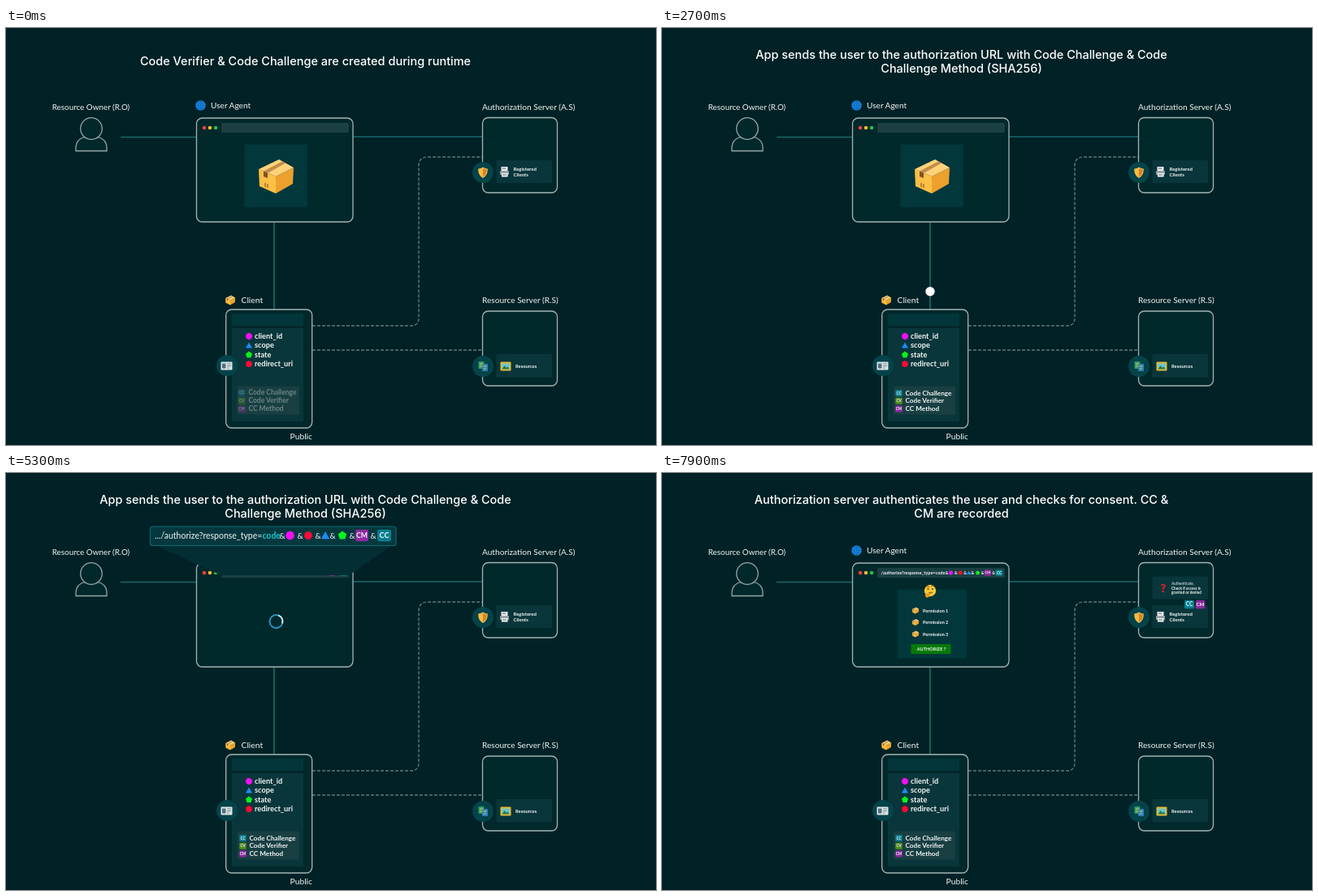
Animation, 800 px wide and 514 px high, one loop 8000 ms. Source, as an HTML page:

```html
<!DOCTYPE html>
<html lang="en">
<head>
<meta charset="utf-8">
<title>PKCE authorization flow</title>
<style>
html, body { margin: 0; width: 100%; height: 100%; overflow: hidden; background: #002125; }
svg { display: block; width: 800px; height: 514px; font: 10px Lato, sans-serif; fill: #f2f6f6; }
.title { font: 500 14.5px Inter, sans-serif; text-anchor: middle; fill: #fff; }
.b { font-weight: 700; }
.mid { text-anchor: middle; }
.box { fill: #01282b; stroke: #a3b4b4; stroke-width: 1.3; }
.line { fill: none; stroke: #17676a; stroke-width: 1.7; }
.dash { fill: none; stroke: #5d7a7b; stroke-width: 1.4; stroke-dasharray: 4 2; }
.person { fill: #01282b; stroke: #94a7a8; stroke-width: 1.3; }
.card { fill: #09363a; }
.badge { fill: #05434a; }
</style>
</head>
<body>
<svg id="stage" viewBox="0 0 800 514"></svg>
<script>
const LOOP = 8000;
const stage = document.getElementById('stage');

// Markup helpers
const rect = (x, y, w, h, fill, r = 0, extra = '') =>
  `<rect x="${x}" y="${y}" width="${w}" height="${h}" rx="${r}" fill="${fill}" ${extra}/>`;
const box = (x, y, w, h) => rect(x, y, w, h, 'none', 7, 'class="box"');
const card = (x, y, w, h) => rect(x, y, w, h, 'none', 1.5, 'class="card"');
const circle = (x, y, r, fill, extra = '') => `<circle cx="${x}" cy="${y}" r="${r}" fill="${fill}" ${extra}/>`;
const path = (d, fill, extra = '') => `<path d="${d}" fill="${fill}" ${extra}/>`;
const text = (x, y, s, size = 10, cls = '', extra = '') =>
  `<text x="${x}" y="${y}" class="${cls}" style="font-size:${size}px" ${extra}>${s}</text>`;
const group = (id, body, transform = '') => `<g id="${id}" transform="${transform}">${body}</g>`;
const at = (x, y, s, body) => `<g transform="translate(${x} ${y}) scale(${s})">${body}</g>`;
const polygon = (x, y, r, n, fill) => {
  const pts = Array.from({ length: n }, (_, i) => {
    const a = i / n * Math.PI * 2 - Math.PI / 2;
    return `${(x + r * Math.cos(a)).toFixed(2)},${(y + r * Math.sin(a)).toFixed(2)}`;
  });
  return `<polygon points="${pts.join(' ')}" fill="${fill}"/>`;
};
const title = (id, lines, y) => group(id, lines.map((s, i) =>
  `<text class="title" x="368.5" y="${y + i * 17}">${s}</text>`).join(''));

// Parameter symbols
const clientId = (x, y, r) => polygon(x, y, r, 8, '#f010f5');
const scope = (x, y, r) => polygon(x, y + r * .2, r * 1.1, 3, '#1e8cf5');
const state = (x, y, r) => polygon(x, y, r, 5, '#08f21c');
const redirect = (x, y, r) => polygon(x, y, r, 7, '#fa0a38');
const tag = (x, y, w, h, s, fill) => rect(x - w / 2, y - h / 2, w, h, fill, w * .14) +
  text(x, y + w * .18, s, w * .54, 'b mid');
const TEAL = '#087f90', LEAF = '#4f8a1f', PLUM = '#8f2a9f';

// Pictograms
const parcel = (x, y, s) => at(x, y, s,
  path('M-21-9 0 0 0 21-20 12Z', '#fcbf45') +
  path('M0 0 22-11 21 9 0 21Z', '#eca12c') +
  path('M-21-9 4-21 22-11 0 0Z', '#ffd27a') +
  path('M-15-6.500 8-18.500 12-16.500-10-4Z', '#c08d4a') +
  path('M-15-6.500-10-4-10 2-15 0Z', '#7d522b') +
  path('M-13 8v5M-10 9v5', 'none', 'stroke="#a06f2e" stroke-width="1.5"'));
const globe = circle(239.5, 95.5, 6.2, '#1685dc') +
  path('M233.7 95.5h11.6M239.5 89.6v11.8M235 92h9M235 99h9M239.5 89.6q-6 5.9 0 11.8q6-5.9 0-11.8',
    'none', 'stroke="#0d62b5" stroke-width=".6"');
const shield = path('M587 171.5q3 2 5.8 2q.5 8-5.8 11.5q-6.3-3.5-5.8-11.5q2.8 0 5.8-2Z', '#f5bd45') +
  path('M587 172.8q2.3 1.5 4.7 1.7q.2 6-4.7 9Z', '#d9822b');
const idCard = rect(264.5, 411.5, 14, 10, '#dfe6e8', 1) + rect(266, 413.5, 4.5, 6, '#53707a') +
  path('M272 414h5M272 416.5h5M272 419h3', 'none', 'stroke="#6d858c"');
const printer = rect(609.5, 171, 8, 6, '#e8eaec') + rect(608, 176, 11, 5, '#9aa2a8', 1) +
  rect(610, 179, 7.5, 4.5, '#f4f4f4') + path('M611 173h4M611 181h5', 'none', 'stroke="#58636b"');
const files = rect(581.5, 411, 7, 9, '#2f9e62', 1) + rect(586, 414, 7, 9, '#2d82b7', 1) +
  path('M583 414h4M583 417h3M587.5 417h4M587.5 420h3', 'none', 'stroke="#e4c65a"');
const picture = rect(608.5, 411.5, 13, 11, '#e8b932', 1) + rect(610.5, 413.5, 9, 7, '#63c7d9') +
  path('M610.5 420.5 613.5 416 616 419 617.5 417 619.5 420.5Z', '#287c45');
const thinker = circle(330, 145, 7.2, '#fbc83a') + circle(327.5, 143, 1, '#5b3a12') + circle(333, 143, 1, '#5b3a12') +
  path('M325.5 140.5q2-1.5 4 0M331.5 139.5q2-1.5 4 .5M328 148q3-1.5 5-.5', 'none',
    'stroke="#6b4312" stroke-width=".9"') +
  path('M324 148.5q1-1.5 2 0l5-.5q1.5.8 0 1.5l-2.5.7q1 3-2 3.5q-3 0-2.5-5.2Z', '#e99a20');

// The request address, used large in the popup and small in the address bar
const url = (start, prefix, size, cls, codeFill) =>
  text(start, 81, `${prefix}/authorize?response_type=<tspan class="b" fill="${codeFill}">code</tspan>`, size, cls) +
  [340, 362, 384, 402, 426, 452].map(x => text(x, 81, '&amp;', 10, cls + ' mid')).join('') +
  clientId(349.5, 77, 5.5) + redirect(372, 77, 5.3) + scope(393, 77, 5.5) + state(414, 77, 5.5) +
  tag(438, 77, 16, 14.5, 'CM', PLUM) + tag(465.5, 77, 17, 14.5, 'CC', TEAL);

const params = [[clientId, 'client_id'], [scope, 'scope'], [state, 'state'], [redirect, 'redirect_uri']];
const secrets = [['CC', 'Code Challenge', TEAL], ['CV', 'Code Verifier', LEAF], ['CM', 'CC Method', PLUM]];

stage.innerHTML =
  // Connections
  path('M141 134.5H235M427 134H587M330 239V347', 'none', 'class="line"') +
  path('M377 367H498Q508 367 508 357V170Q508 159 519 159H587M377 397H587', 'none', 'class="dash"') +
  group('dot', circle(0, 0, 5.7, '#fff')) +
  // Resource owner
  text(104.5, 100.5, 'Resource Owner (R.O)', 9.85, 'mid') +
  path('M86 151.5V146Q87 137.5 96 134.5Q105 140 114 134.5Q123 137.5 124 146V151.5Z', '', 'class="person"') +
  circle(105, 124, 13.3, '', 'class="person"') +
  // User agent
  globe + text(252, 99, 'User Agent', 10.1) +
  box(234.5, 111, 192.5, 128) +
  ['#f04438', '#f5b82e', '#22c24a'].map((c, i) => circle(244 + i * 7, 123, 2.3, c)).join('') +
  rect(265, 117, 157, 12, '#1b3f42', 1.5) +
  group('barUrl', url(182, '', 10.8, 'b', '#f2f6f6'), 'translate(176.2 83.5) scale(.513)') +
  group('app', rect(293.5, 143.5, 77.5, 77.5, '#02373b') + parcel(332, 183, 1)) +
  group('spinner', circle(0, 0, 8, 'none', 'stroke="#2496bd" stroke-width="1.9"') +
    path('M-8 0A8 8 0 0 1 0-8', 'none', 'stroke="#c9edf5" stroke-width="1.9"')) +
  group('consent', rect(289.5, 143.5, 85.5, 85, '#02373b') + thinker +
    [1, 2, 3].map(n => parcel(312, 155 + n * 14.5, .19) +
      text(321, 157.3 + n * 14.5, 'Permission ' + n, 5.5, 'b')).join('') +
    rect(306.5, 211, 49, 12, '#067a08') + text(331.5, 219, 'AUTHORIZE ?', 5.5, 'b mid')) +
  // Authorization server
  text(586, 100.5, 'Authorization Server (A.S)', 10.15) + box(586.5, 110.5, 92, 92.5) +
  card(603.5, 163, 68.5, 28) + printer +
  text(624.5, 176, 'Registered', 6, 'b') + text(624.5, 183, 'Clients', 6, 'b') +
  circle(587, 178, 13, '', 'class="badge"') + shield +
  group('check', card(603.5, 127.5, 68.5, 28) +
    group('mark', text(0, 6.5, '?', 22, 'b mid', 'fill="#e3202e" stroke="#e3202e" stroke-width=".8"')) +
    text(627, 138, 'Authenticate,', 4.7) + text(627, 143.5, 'Check if access is', 4.7, 'b') +
    text(627, 149, 'granted or denied', 4.7, 'b') +
    tag(649, 162, 12, 10.5, 'CC', TEAL) + tag(662.5, 162, 11.5, 10.5, 'CM', PLUM)) +
  // Resource server
  text(586, 339, 'Resource Server (R.S)', 10.1) + box(586.5, 349, 92, 92) +
  card(603.5, 402, 68.5, 28.5) + picture + text(627, 419, 'Resources', 5.8, 'b') +
  circle(587, 417, 13, '', 'class="badge"') + files +
  // Client
  parcel(276, 335.5, .28) + text(289.5, 339, 'Client', 10.3) + box(270.7, 347, 106, 146) +
  rect(278, 352, 88, 15, '#03363a') + rect(278, 370, 88, 115, '#09363a') +
  circle(272, 416, 13, '', 'class="badge"') + idCard +
  params.map(([shape, name], i) => shape(299, 380 + i * 11.4, 4.2) +
    text(306, 383 + i * 11.4, name, 9.2, 'b')).join('') +
  rect(284.5, 441.5, 76.5, 35, '#193f42', 1.5) +
  group('secrets', secrets.map(([s, name, c], i) => tag(291.5, 450 + i * 9.7, 8.5, 8, s, c) +
    text(299.5, 452.5 + i * 9.6, name, 8.2, 'b')).join('')) +
  text(349.5, 507, 'Public', 10.3) +
  // Enlarged address
  group('popup', path('M177 86H480L422 126H265Z', '#032f34') +
    rect(177.5, 66, 302.5, 23.5, '#04383e', 3, 'stroke="#0b6b72" stroke-width="1.2"') +
    url(183, '...', 10.5, '', '#18c3c8')) +
  // Headings
  title('title1', ['Code Verifier &amp; Code Challenge are created during runtime'], 46) +
  title('title2', ['App sends the user to the authorization URL with Code Challenge &amp; Code',
    'Challenge Method (SHA256)'], 38) +
  title('title3', ['Authorization server authenticates the user and checks for consent. CC &amp;',
    'CM are recorded'], 38);

const el = id => document.getElementById(id);
const ramp = (t, from, to) => Math.min(1, Math.max(0, (t - from) / (to - from)));
const easeQuad = p => p < .5 ? 2 * p * p : 1 - 2 * (1 - p) ** 2;
const easeCubic = p => p < .5 ? 4 * p ** 3 : 1 - 4 * (1 - p) ** 3;
const backIn = (p, s = 2) => p * p * ((s + 1) * p - s);
const fade = (id, v) => el(id).setAttribute('opacity', v);
const move = (id, v) => el(id).setAttribute('transform', v);
const zoom = (id, x, y, s) => {
  el(id).style.display = s > .001 ? '' : 'none';
  move(id, `translate(${x} ${y}) scale(${s}) translate(${-x} ${-y})`);
};

function draw(t) {
  fade('title1', 1 - ramp(t, 1900, 2150));
  fade('title2', ramp(t, 2150, 2400) * (1 - ramp(t, 5750, 6000)));
  fade('title3', ramp(t, 6000, 6250));

  const reveal = ramp(t, -300, 500);
  fade('secrets', reveal);
  zoom('secrets', 328, 459, 1.06 - .06 * reveal);

  const trip = easeCubic(ramp(t, 2370, 3270));
  move('dot', `translate(330 ${346 - 107 * trip})`);
  fade('dot', ramp(t, 2370, 2500) * (1 - ramp(t, 3200, 3350)));

  fade('barUrl', ramp(t, 3950, 4250));
  zoom('popup', 328.5, 120.5, easeQuad(ramp(t, 3925, 4425)) - easeQuad(ramp(t, 5400, 5800)));
  zoom('app', 332, 182.5, 1 - backIn(ramp(t, 3900, 4350)));

  const spin = ramp(t, 4350, 4550) - ramp(t, 7250, 7450);
  el('spinner').style.display = spin > .001 ? '' : 'none';
  move('spinner', `translate(332.5 183) rotate(${t * .36}) scale(${spin})`);

  fade('check', ramp(t, 6150, 6400));
  move('mark', `translate(617 142.5) scale(${.8 + .18 * Math.cos((t - 6900) / 1000 * Math.PI)})`);
  zoom('consent', 332, 186, 1 - backIn(1 - ramp(t, 7450, 7880)));
}

function frame() {
  draw(performance.now() % LOOP);
  requestAnimationFrame(frame);
}
frame();
</script>
</body>
</html>
```
